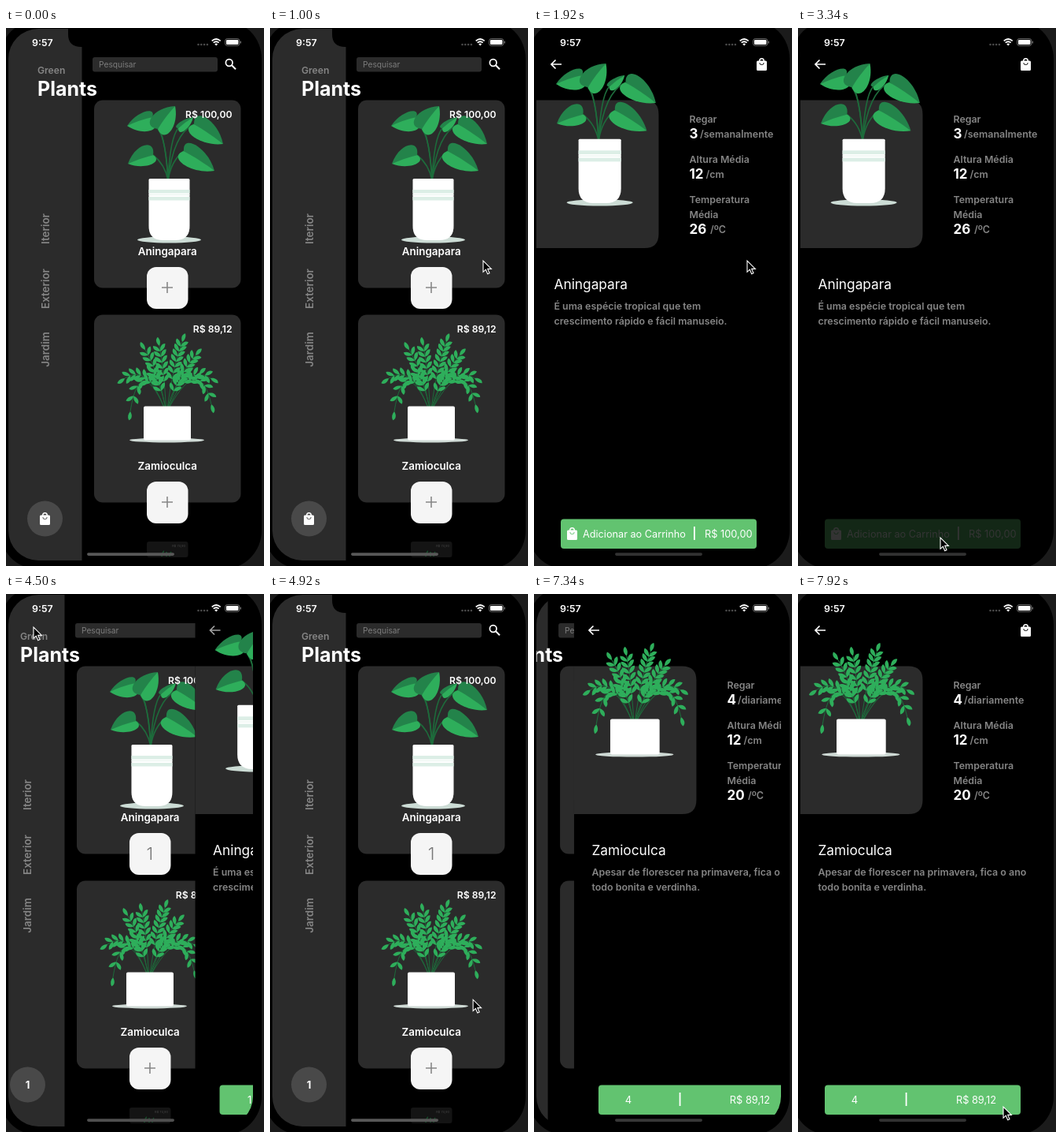
Write an HTML page that moves like this. It is 328x682 px and loops after 8000 ms.

```html
<!DOCTYPE html>
<html lang="pt">
<head>
<meta charset="utf-8">
<title>Green Plants</title>
<style>
html, body { margin: 0; width: 100%; height: 100%; overflow: hidden; background: #000; }
svg { display: block; width: 328px; height: 682px; font-family: Inter, "Open Sans", sans-serif; }
</style>
</head>
<body>
<svg viewBox="0 0 328 682">
  <defs id="defs"></defs>
  <g id="scene"></g>
</svg>
<script>
const LOOP = 8000, STEP = 1000 / 12, WIDTH = 311;
const CARD = '#2b2b2b', GRAY = '#858585', LEAF = '#2eae5b', SHADE = '#23834a', STEM = '#1d6b3b';

const clamp = v => Math.max(0, Math.min(1, v));
const lerp = (a, b, k) => a + (b - a) * k;

function text(x, y, size, str, fill = '#fff', weight = 600, anchor = 'start') {
  return `<text x="${x}" y="${y}" font-size="${size}" fill="${fill}" font-weight="${weight}" text-anchor="${anchor}">${str}</text>`;
}
function rect(x, y, w, h, r, fill) {
  return `<rect x="${x}" y="${y}" width="${w}" height="${h}" rx="${r}" fill="${fill}"/>`;
}
function line(d, stroke, width) {
  return `<path d="${d}" fill="none" stroke="${stroke}" stroke-width="${width}"/>`;
}
function group(body, attrs) {
  return `<g ${attrs}>${body}</g>`;
}

// A broad heart-shaped leaf from base to tip: one shaded and one bright half.
function broadLeaf([x, y, tx, ty, shadeSide, brightSide]) {
  const len = Math.hypot(tx - x, ty - y);
  const angle = Math.atan2(ty - y, tx - x) * 180 / Math.PI;
  const half = (w, fill) =>
    `<path fill="${fill}" d="M0 0C${-len * .3} ${w} ${len * .5} ${w * 1.15} ${len} 0Q${len * .5} ${-w * .1} 0 0Z"/>`;
  return line(`M206 193Q${lerp(x, 206, .8)} ${y + 12} ${x} ${y}`, STEM, 1.6) +
    group(half(shadeSide, SHADE) + half(brightSide, LEAF), `transform="translate(${x} ${y}) rotate(${angle})"`);
}

function aningapara() {
  const leaves = [
    [186, 113, 154, 124, 12, -19], [193, 128, 215, 99, -19, 18], [219, 127, 238, 113, -6, 9],
    [239, 122, 276, 147, -19, 17], [187, 161, 155, 172, 19, -13], [226, 156, 265, 181, -18, 18]
  ];
  return leaves.map(broadLeaf).join('') +
    '<ellipse cx="207.5" cy="268.5" rx="40.5" ry="4" fill="#ccdcd5"/>' +
    '<path fill="#fff" d="M183 191h49q1.500 0 1.500 1.500V251q0 18-18 18h-16q-18 0-18-18V192.500q0-1.500 1.500-1.500z"/>' +
    rect(181.5, 205, 52, 4.5, 0, '#dceee6') + rect(181.5, 211, 52, 1, 0, '#e8f4ee') +
    rect(181.5, 214, 52, 4.5, 0, '#dceee6');
}

function zamioculca() {
  // Each branch: end point, then the control point of its arc.
  const branches = [
    [151, 444, 180, 425], [158, 486, 170, 412], [177, 408, 196, 440], [195, 403, 201, 435],
    [224, 398, 212, 430], [241, 415, 222, 435], [260, 444, 230, 425], [261, 477, 246, 412],
    [186, 436, 196, 450], [229, 438, 214, 450]
  ];
  let stems = '', leaves = '';
  for (const [ex, ey, cx, cy] of branches) {
    const bx = lerp(204, ex, .06), by = 481;
    stems += line(`M${bx} ${by}Q${cx} ${cy} ${ex} ${ey}`, STEM, 1);
    const count = Math.round(Math.hypot(ex - bx, ey - by) / 15) + 1;
    for (let i = 0; i <= count; i++) {
      const t = lerp(.38, 1, i / count), u = 1 - t;
      const x = u * u * bx + 2 * u * t * cx + t * t * ex;
      const y = u * u * by + 2 * u * t * cy + t * t * ey;
      const dir = Math.atan2(u * (cy - by) + t * (ey - cy), u * (cx - bx) + t * (ex - cx)) * 180 / Math.PI;
      for (const turn of i < count ? [-44, 42] : [0])
        leaves += `<path fill="${LEAF}" d="M0 0C4-3.500 9-4 11.500 0C8 2.500 4 2.500 0 0" transform="translate(${x} ${y}) rotate(${dir + turn})"/>`;
    }
  }
  return stems + leaves +
    '<ellipse cx="204.500" cy="522.500" rx="47.500" ry="3" fill="#cfdad5"/>' + rect(175, 479.5, 60, 43, 2, '#fff');
}

document.getElementById('defs').innerHTML =
  `<clipPath id="screen"><rect x="3" y="1" width="${WIDTH}" height="674" rx="38"/></clipPath>` +
  group(aningapara(), 'id="plant0"') + group(zamioculca(), 'id="plant1"') +
  `<path id="bag" fill="#fff" fill-rule="evenodd" d="M-3.500-4.500a3.500 3.500 0 0 1 7 0H5q1.500 0 1.500 1.500V6.500q0 1.500-1.500 1.500H-5q-1.500 0-1.500-1.500V-3q0-1.500 1.500-1.500zM-2-4.500H2a2 2 0 0 0-4 0M-3-2a3 3 0 0 0 6 0H2.200a2.200 2.200 0 0 1-4.400 0z"/>`;

const PLANTS = [
  { name: 'Aningapara', price: 'R$ 100,00', water: ['3', '/semanalmente'], temp: '26',
    about: ['É uma espécie tropical que tem', 'crescimento rápido e fácil manuseio.'],
    place: 'translate(28 43) scale(1.04) translate(-154 -97)' },
  { name: 'Zamioculca', price: 'R$ 89,12', water: ['4', '/diariamente'], temp: '20',
    about: ['Apesar de florescer na primavera, fica o ano', 'todo bonita e verdinha.'],
    place: 'translate(49 158) scale(1.045) translate(-175 -479)' }
];

function card(i, count, opacity) {
  const y = 91.5 + 272 * i, p = PLANTS[i];
  const mark = count
    ? text(205, y + 245.5, 22, count, '#777', 300, 'middle')
    : line(`M198 ${y + 237.5}h14m-7-7v14`, '#888', 1.6);
  return rect(112, y, 186.5, 238, 11, CARD) + `<use href="#plant${i}"/>` +
    text(287.5, y + 22.5, 12.2, p.price, '#fff', 600, 'end') +
    text(205.2, y + 196, 13.4, p.name, '#fff', 600, 'middle') +
    group(rect(179, y + 211.5, 52.5, 53, 12, '#f5f5f5') + mark, `opacity="${opacity}"`);
}

function home(counts, dim) {
  const cart = counts.filter(Boolean).length;
  const tab = (y, label) => group(text(0, 0, 13.4, label, GRAY, 600, 'middle'), `transform="translate(54.500 ${y}) rotate(-90)"`);
  return rect(3, 1, 93.5, 674, 0, CARD) +
    text(40, 58, 12.1, 'Green', GRAY) + text(40, 86, 25, 'Plants', '#fff', 700) +
    tab(254.5, 'Iterior') + tab(330.5, 'Exterior') + tab(407.5, 'Jardim') +
    '<circle cx="49.500" cy="622" r="22.500" fill="#494949"/>' +
    (cart ? text(49.5, 627, 13, cart, '#fff', 700, 'middle') : '<use href="#bag" x="49.500" y="622"/>') +
    rect(110, 37, 159, 18.5, 3, CARD) + text(118, 50, 10.2, 'Pesquisar', '#7d7d7d', 400) +
    '<circle cx="283.700" cy="44" r="4.300" fill="none" stroke="#fff" stroke-width="1.700"/>' + line('M287 47.300l5 5', '#fff', 2) +
    card(0, counts[0], 1) + card(1, counts[1], dim) +
    rect(179, 651, 52.5, 20, 3, '#141414') + text(228, 658, 4, 'R$ 74,90', '#444', 400, 'end') +
    line('M198 670q1-6 3-7m3 7v-6m4 6q0-4 2-6', '#174d2b', 1.5);
}

function detail(i, count, buttonOpacity, backOpacity) {
  const p = PLANTS[i];
  const fact = (y, value, unit, ux) => text(197.5, y, 17, value, '#fff', 700) + text(ux, y - 1, 12.5, unit, GRAY);
  const bar = x => rect(x, 632, 1.8, 17, 0, '#fff');
  const label = count
    ? text(72, 646, 13, count, '#fff', 400, 'middle') + bar(136.7) + text(226.5, 646, 12.8, p.price, '#fff', 400, 'middle')
    : '<use href="#bag" x="48.500" y="641"/>' + text(62, 646, 12.7, 'Adicionar ao Carrinho', '#fff', 400) +
      bar(203) + text(217, 646, 12.8, p.price, '#fff', 400);
  return rect(3, 1, WIDTH, 674, 0, '#000') +
    `<path fill="${CARD}" d="M3 91.500H140.500q18 0 18 18V261q0 18-18 18H3z"/>` +
    `<use href="#plant${i}" transform="${p.place}"/>` +
    group(line('M35 46H22M27.500 40.500L22 46l5.500 5.500', '#fff', 1.7), `opacity="${backOpacity}"`) +
    '<use href="#bag" x="289.500" y="46"/>' +
    text(197.5, 120, 12.4, 'Regar', GRAY) + fact(140.3, ...p.water, 211) +
    text(197.5, 171, 12.4, 'Altura Média', GRAY) + fact(191, '12', '/cm', 218.5) +
    text(197.5, 222, 12.4, 'Temperatura', GRAY) + text(197.5, 241, 12.4, 'Média', GRAY) + fact(261, p.temp, '/ºC', 224) +
    text(25.5, 331, 17.3, p.name, '#fff', 400) +
    text(25.5, 357, 12.4, p.about[0], GRAY) + text(25.5, 376, 12.4, p.about[1], GRAY) +
    group(rect(34, 622.5, 249, 37.5, 4, '#62c370') + label, `opacity="${buttonOpacity}"`);
}

function chrome(p) {
  const dots = [244.5, 248.3, 252.1, 255.9].map(x => `<circle cx="${x}" cy="21" r="1.300" fill="#4a4a4a"/>`).join('');
  const shade = lerp(88, 50, p);
  return '<path d="M79 0V8q0 16 17 16H221q17 0 17-16V0z"/>' +
    text(33, 22.5, 12.4, '9:57') + dots +
    line('M261.700 16.300q5.500-4.600 11 0M263.700 18.700q3.500-2.900 7 0', '#fff', 1.7) +
    '<path fill="#fff" d="M265.200 20.300q2-1.600 4 0l-2 2.200z"/>' +
    '<rect x="278.700" y="13.600" width="18" height="8.800" rx="2.500" fill="none" stroke="#888" stroke-width=".8"/>' +
    rect(280, 14.9, 15.4, 6.2, 1.4, '#fff') + rect(297.6, 16.5, 1.2, 3, .6, '#888') +
    rect(103, 665.3, 111, 3.6, 1.8, `rgb(${shade},${shade},${shade})`);
}

// Pointer stops: time, x, y.
const PATH = [
  [85, 253, 462], [340, 256, 420], [750, 271, 295], [2800, 271, 295], [3160, 181, 646], [3620, 181, 646],
  [4166, 35, 42], [4500, 35, 42], [5000, 276, 552], [5170, 281, 560], [5416, 215, 595], [5670, 215, 595],
  [5916, 219, 596], [6840, 219, 596], [7100, 222, 545], [7650, 280, 600], [7910, 261, 650], [8000, 261, 650]
];
function pointer(t) {
  if (t < 80 || (t > 7120 && t < 7650)) return '';
  const n = Math.max(1, PATH.findIndex(s => s[0] >= t));
  const [a, b] = [PATH[n - 1], PATH[n]];
  const k = clamp((t - a[0]) / (b[0] - a[0])), e = k * k * (3 - 2 * k);
  return `<path d="M0 0V14.300l3.300-3.100 2.400 5.500 2.300-1-2.300-5.300H10.400z" stroke="#fff" stroke-width="1.100" transform="translate(${lerp(a[1], b[1], e)} ${lerp(a[2], b[2], e)})"/>`;
}

// Share of a page slide done, started at the given time; it settles within a pixel.
function slide(t, start) {
  const left = t < start ? 1 : Math.exp((start - t) / 97);
  return left < .004 ? 1 : 1 - left;
}
// Touch feedback: quick dim, slower return.
const press = (t, down, up) => Math.max(0, clamp((t - down) / 150) - clamp((t - up) / 250));

const OPEN_FIRST = 1090, BACK = 4360, OPEN_SECOND = 7152;

function draw(t) {
  const p = slide(t, OPEN_FIRST) - slide(t, BACK) + slide(t, OPEN_SECOND);
  const counts = [+(t > 3400), [5990, 6410, 6660, 6825].filter(s => t > s).length];
  const i = t < 5500 ? 0 : 1;
  const dim = 1 - .4 * (press(t, 5850, 5920) + press(t, 6350, 6370));
  const moved = WIDTH * p;
  return rect(0, 0, 328, 682, 0, '#1b1b1b') + rect(-8, -10, 333, 696, 49, '#000') +
    group(
      group(home(counts, dim), `transform="translate(${-.3 * moved} 0)"`) +
      group(detail(i, counts[i], 1 - .8 * press(t, 3160, 3340), 1 - .4 * press(t, 4270, 4480)),
        `transform="translate(${WIDTH - moved} 0)"`) +
      chrome(p), 'clip-path="url(#screen)"') +
    pointer(t);
}

const scene = document.getElementById('scene'), begin = performance.now();
let shown = -1;
function tick() {
  const step = Math.floor(((performance.now() - begin) % LOOP + 5) / STEP) % 96;
  if (step !== shown) scene.innerHTML = draw((shown = step) * STEP);
  requestAnimationFrame(tick);
}
tick();
</script>
</body>
</html>
```
